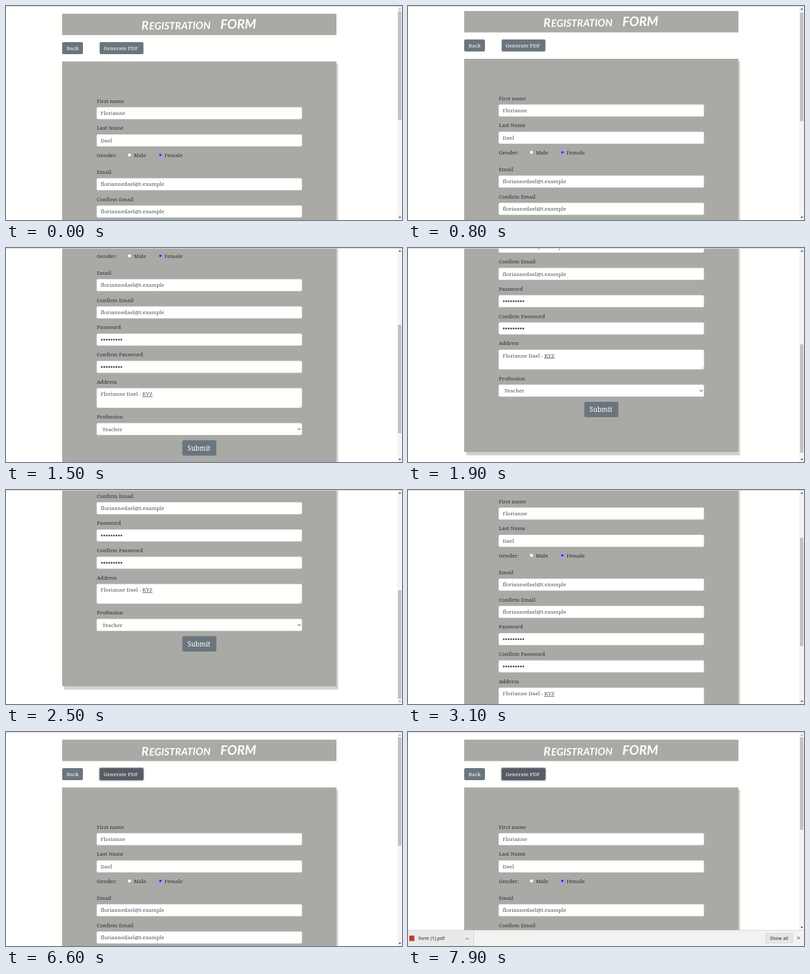
These frames come from a looping animation (592 by 320 pixels, 8000 ms). An HTML page:

```html
<!DOCTYPE html>
<html lang="en">
<head>
<meta charset="utf-8">
<title>Registration form</title>
<style>
  html, body { margin: 0; width: 100%; height: 100%; overflow: hidden; background: #fffffe; }
  svg { display: block; width: 592px; height: 320px; }
  text { font: 7.9px "Noto Serif", serif; fill: #2b2f33; white-space: pre; }
  .value { fill: #4d545b; }
  .btn { fill: #fff; }
  .big { font-size: 10px; }
  .title { font-family: Lato, sans-serif; font-style: italic; font-weight: 700; fill: #fff; }
  .ui { font: 600 6.8px "Open Sans", sans-serif; fill: #4a4a4a; }
</style>
</head>
<body>
<svg id="stage" viewBox="0 0 592 320">
  <g id="page"></g>
  <g id="scroller"></g>
  <g id="shelf"></g>
  <rect width="592" height="1" fill="#d9d9d8"/>
</svg>
<script>
const LOOP = 8000, STEP = 100;
const VIEW = 320, CONTENT = 600, SHELF = 24;
const GREY = '#a9aaa6', SLATE = '#6b757d';

// [time, value] pairs, linear in between
const SCROLL = [
  [700, 0], [800, 4], [900, 15], [1000, 35], [1100, 61], [1500, 211],
  [1600, 235], [1700, 252], [1800, 262], [1900, 268.5], [2200, 280],
  [2800, 280], [2900, 243], [3100, 125], [3300, 0]
];
const HOVER = [[4000, 0], [4300, 1]];
const OPEN = [[6700, 0], [7000, 1]];
const FOCUS_AT = 4700;

const $ = id => document.getElementById(id);
const page = $('page'), scroller = $('scroller'), shelf = $('shelf');

function add(parent, tag, attrs, content) {
  const el = document.createElementNS('http://www.w3.org/2000/svg', tag);
  for (const key in attrs) el.setAttribute(key, attrs[key]);
  if (content) el.textContent = content;
  return parent.appendChild(el);
}
const box = (parent, x, y, width, height, fill, rx = 0) =>
  add(parent, 'rect', { x, y, width, height, fill, rx });
const text = (parent, x, y, content, cls = '') =>
  add(parent, 'text', { x, y, class: cls }, content);
const line = (parent, d, stroke, width = 1) =>
  add(parent, 'path', { d, stroke, 'stroke-width': width, fill: 'none' });
const dot = (cx, cy, r, fill, stroke = 'none') =>
  add(page, 'circle', { cx, cy, r, fill, stroke, 'stroke-width': 0.8 });

function field(y, label, value, height = 18) {
  text(page, 135.7, y, label);
  const rect = box(page, 135.5, y + 6.7, 307, height, '#fffffe', 2);
  rect.setAttribute('stroke', '#c3c6c6');
  rect.setAttribute('stroke-width', 0.4);
  if (value) text(page, 141.5, y + 18.4, value, 'value');
}

function password(y, label) {
  field(y, label);
  for (let i = 0; i < 9; i++) dot(143.2 + i * 3.65, y + 15.8, 1.3, '#42484e');
}

function buildPage() {
  box(page, 84, 11.5, 410, 32, GREY);
  const title = add(page, 'g', { transform: 'rotate(-0.6 290 34)' });
  [[202.5, 'R', 18], [214, 'EGISTRATION', 15.2], [320.5, 'FORM', 19.5]].forEach(([x, word, size]) =>
    text(title, x, 34.5, word, 'title').style.fontSize = size + 'px');

  box(page, 84, 54, 31, 18, SLATE, 2);
  text(page, 90.6, 66, 'Back', 'btn');
  const ring = box(page, 138.5, 52.5, 68, 21, '#b9bfc5', 3.5);
  const button = box(page, 140, 54, 65.5, 18, SLATE, 2);
  text(page, 146, 66, 'Generate PDF', 'btn');

  box(page, 87, 87, 409.5, 491.5, '#d1d1ce');
  box(page, 84, 83, 410, 490.5, GREY);

  field(144.5, 'First name', 'Florianne');
  field(185.3, 'Last Name', 'Dael');

  text(page, 135.7, 225.9, 'Gender:');
  dot(184.6, 222.7, 2.9, '#fffffe', '#8b8c8a');
  text(page, 191, 225.9, 'Male');
  dot(230.7, 222.7, 2.9, '#c9cdfa', '#7f86e6');
  dot(230.7, 222.7, 1.8, '#1c1fe0');
  text(page, 237, 225.9, 'Female');

  const mail = 'floriannedael@t.example';
  field(250.8, 'Email', mail);
  field(291.6, 'Confirm Email', mail);
  password(332.3, 'Password');
  password(373.1, 'Confirm Password');

  field(413.9, 'Address', '', 29.5);
  const address = text(page, 141.5, 432, 'Florianne Dael - ', 'value');
  const word = add(address, 'tspan', {}, 'KYZ');
  word.style.textDecoration = 'underline wavy #d8423c 0.5px';
  line(page, 'M438.5 449 l2.8 -2.8 M440.3 449 l1 -1', '#8a8a8a', 0.5);

  field(466.1, 'Profession');
  text(page, 144, 484.6, 'Teacher', 'value');
  line(page, 'M436.3 480.8 l2 2.1 l2 -2.1', '#333', 1);

  box(page, 263.5, 498.5, 51, 23, SLATE, 2.5);
  text(page, 271.3, 513.6, 'Submit', 'btn big');
  return { ring, button };
}

function buildScroller() {
  const track = box(scroller, 585, 0, 7, VIEW, '#f4f4f3');
  const thumb = box(scroller, 586, 8, 5, 162, '#c2c2c1');
  const up = add(scroller, 'path', { d: 'M586.8 5.5 h4 l-2 -2.4z' });
  const down = add(scroller, 'path', { d: 'M586.8 -5 h4 l-2 2.4z' });
  return { track, thumb, up, down };
}

function buildShelf() {
  box(shelf, 0, 0, 592, SHELF, '#f2f2f0');
  box(shelf, 0, 0, 592, 0.8, '#d3d3d1');
  box(shelf, 0, 1, 98, SHELF, '#e9e9e7');
  box(shelf, 98, 1, 0.8, SHELF, '#cfcfcd');
  box(shelf, 2, 8.5, 7.5, 8, '#bd3530');
  text(shelf, 15.8, 15.4, 'form (1).pdf', 'ui');
  line(shelf, 'M86.5 14.2 l2 -2.2 l2 2.2', '#666');
  const all = box(shelf, 534.8, 5.2, 40.4, 14, '#e6e6e4', 1.5);
  all.setAttribute('stroke', '#c9c9c7');
  all.setAttribute('stroke-width', 0.6);
  text(shelf, 541.3, 14.6, 'Show all', 'ui');
  line(shelf, 'M581.7 10 l4 4 m0 -4 l-4 4', '#555', 0.9);
}

function sample(keys, t) {
  if (t <= keys[0][0]) return keys[0][1];
  for (let i = 1; i < keys.length; i++) {
    const [t0, a] = keys[i - 1], [t1, b] = keys[i];
    if (t <= t1) return a + (b - a) * (t - t0) / (t1 - t0);
  }
  return keys[keys.length - 1][1];
}

const mix = (from, to, k) =>
  `rgb(${from.map((c, i) => Math.round(c + (to[i] - c) * k)).join()})`;

const { ring, button } = buildPage();
const bar = buildScroller();
buildShelf();

function draw(t) {
  const top = sample(SCROLL, t);
  const height = VIEW - SHELF * sample(OPEN, t);
  const rail = height - 16;
  const focused = t >= FOCUS_AT;

  page.setAttribute('transform', `translate(0 ${-top})`);
  shelf.setAttribute('transform', `translate(0 ${height})`);

  bar.track.setAttribute('height', height);
  bar.thumb.setAttribute('y', 8 + rail * top / CONTENT);
  bar.thumb.setAttribute('height', rail * height / CONTENT);
  bar.up.setAttribute('fill', top > 0 ? '#505050' : '#a9a9a9');
  bar.down.setAttribute('fill', top < CONTENT - height ? '#505050' : '#a9a9a9');
  bar.down.setAttribute('transform', `translate(0 ${height})`);

  ring.setAttribute('visibility', focused ? 'visible' : 'hidden');
  button.setAttribute('fill', focused ? '#555c63'
    : mix([107, 117, 125], [90, 98, 104], sample(HOVER, t)));
}

let start;
function tick(now) {
  start ??= now;
  const t = (now - start) % LOOP;
  draw(Math.floor(t / STEP) * STEP);
  requestAnimationFrame(tick);
}
draw(0);
requestAnimationFrame(tick);
</script>
</body>
</html>
```
